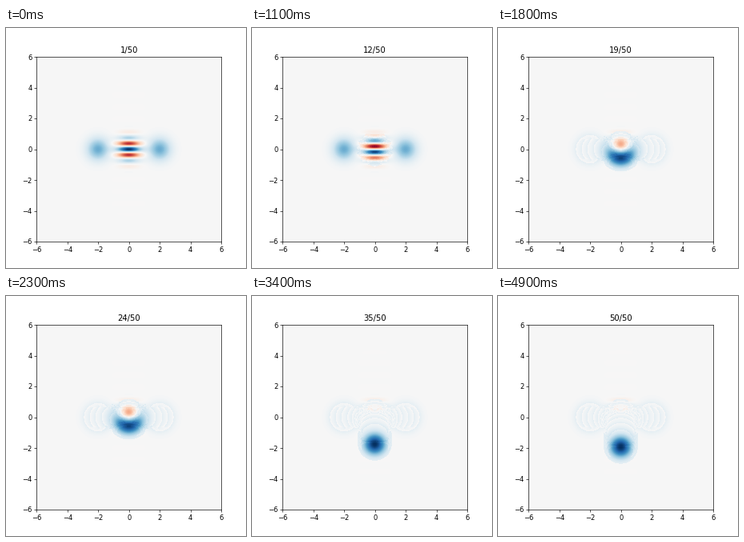
A matplotlib script for the animation above (5000 ms loop, 300 by 300 pixels).

```python
import numpy as np
import matplotlib.pyplot as plt
from matplotlib.animation import FuncAnimation

FRAMES = 50
INTERVAL = 100
LIMIT = 6
PIXELS = 231
REFRESH = 0.075  # smaller colour changes leave the previous colour on screen

plt.rcParams["font.family"] = "DejaVu Sans"

half_cell = LIMIT / PIXELS
axis = np.linspace(-LIMIT + half_cell, LIMIT - half_cell, PIXELS)
x, y = np.meshgrid(axis, axis)


def ease(t, start, end):
    u = np.clip((t - start) / (end - start), 0, 1)
    return u * u * (3 - 2 * u)


def wigner(a, phi, b):
    """Wigner function of two superposed coherent states, peak 1 for one."""
    u = y + b
    packets = np.exp(-2 * ((x - a) ** 2 + u**2)) + np.exp(-2 * ((x + a) ** 2 + u**2))
    fringes = 2 * np.exp(-2 * (x**2 + u**2)) * np.cos(4 * a * u + phi)
    return (packets + fringes) / (2 + 2 * np.exp(-2 * a**2) * np.cos(phi))


def state(t):
    """Turn the phase, merge the packets, then drop the single blob."""
    a = 2 - 1.88 * ease(t, 11, 18)
    tilt = np.tan(np.pi / 4 * min(t / 11, 1)) * max(a, 1)
    tilt *= 1 - ease(t, 24, 33)
    phi = 2 * np.arctan(tilt / a)
    b = 1.95 * ease(t, 28, 35.5)
    return wigner(a, phi, b)


def colours(t):
    return plt.get_cmap("RdBu")((state(t) + 1) / 2)[..., :3]


def build_images():
    images = [colours(0)]
    for t in range(1, FRAMES):
        fresh, shown = colours(t), images[-1]
        change = np.linalg.norm(fresh - shown, axis=2, keepdims=True)
        images.append(np.where(change > REFRESH, fresh, shown))
    return images


images = build_images()

fig, ax = plt.subplots(figsize=(5, 5), dpi=60)
picture = ax.imshow(
    images[0],
    origin="lower",
    extent=(-LIMIT, LIMIT, -LIMIT, LIMIT),
    interpolation="nearest",
)
ticks = range(-LIMIT, LIMIT + 1, 2)
ax.set_xticks(ticks)
ax.set_yticks(ticks)
title = ax.set_title(f"1/{FRAMES}")


def update(i):
    picture.set_data(images[i])
    title.set_text(f"{i + 1}/{FRAMES}")
    return picture, title


anim = FuncAnimation(
    fig, update, frames=FRAMES, interval=INTERVAL, repeat=True, repeat_delay=0
)
plt.show()
```
